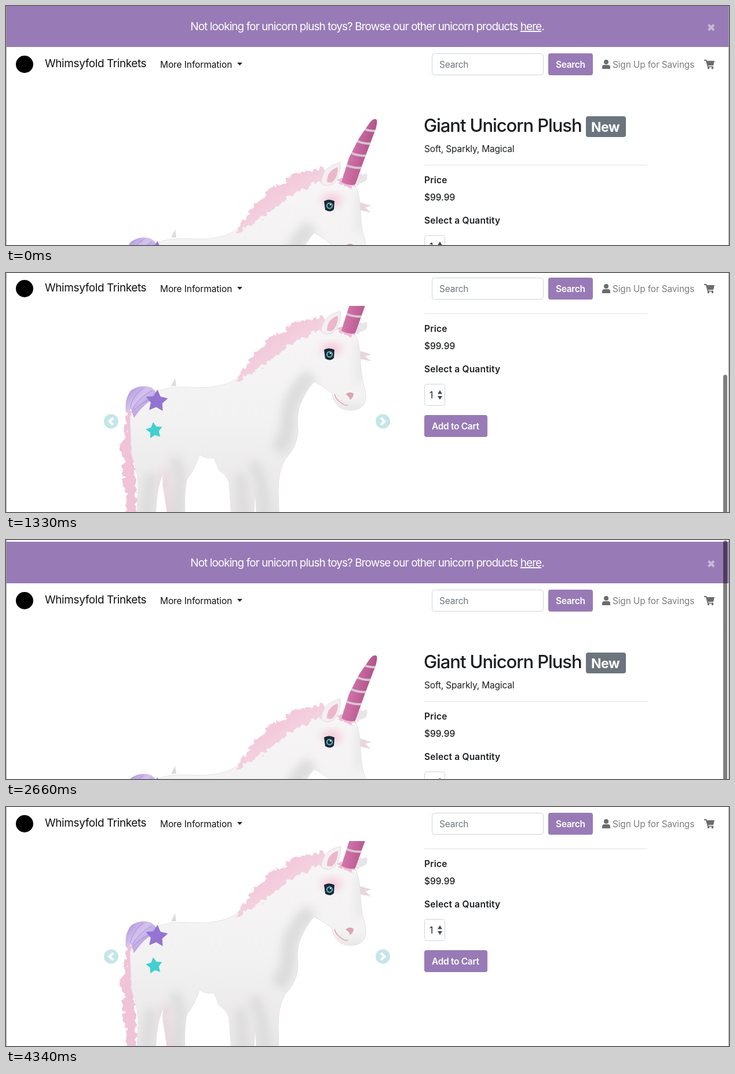
Animation of 1248 by 414 pixels, one loop 4410 ms. Source, as an HTML page:

```html
<!DOCTYPE html>
<html lang="en">
<head>
<meta charset="utf-8">
<title>Plush shop</title>
<style>
  html, body { margin: 0; width: 100%; height: 100%; overflow: hidden; background: #fff; }
  #stage { position: relative; width: 1248px; height: 414px; overflow: hidden; background: #fff; }
  #stage > * { position: absolute; left: 0; top: 0; }
  #page, #nav { will-change: transform; }
  svg { display: block; overflow: visible; }
  text { font: 400 15.5px Inter, Roboto, sans-serif; letter-spacing: -.18px; fill: #1b1e21; white-space: pre; }
  .brand { font-size: 19px; letter-spacing: -.42px; fill: #111; }
  .lead { font-size: 19px; letter-spacing: -.96px; fill: #fff; text-anchor: middle; }
  .menu { letter-spacing: -.1px; fill: #111; }
  .title { font-size: 31px; font-weight: 500; letter-spacing: -1.08px; }
  .badge { font-size: 23px; font-weight: 700; letter-spacing: -.5px; fill: #fff; }
  .label { font-weight: 600; letter-spacing: .2px; }
  .price { font-weight: 500; letter-spacing: 0; }
  .button { font-weight: 600; letter-spacing: -.32px; fill: #fff; }
  .hint { fill: #6c757d; }
  .soft { fill: #7d7d7d; }
  .purple { fill: #987bb6; }
  .field { fill: #fff; stroke: #ced4da; }
  #thumb { left: 1238px; width: 7px; height: 520px; border-radius: 4px; background: rgba(0,0,0,.5); }
  .edge { width: 1px; height: 414px; background: #a5a5a5; }
</style>
</head>
<body>
<div id="stage">
  <div id="page">
    <svg width="1248" height="700">
      <defs>
        <filter id="fur" x="-20%" y="-20%" width="140%" height="140%" color-interpolation-filters="sRGB">
          <feTurbulence type="fractalNoise" baseFrequency=".12" numOctaves="2" seed="4"/>
          <feDisplacementMap in="SourceGraphic" scale="15" xChannelSelector="R" yChannelSelector="G"/>
        </filter>
        <filter id="blur" x="-50%" y="-50%" width="200%" height="200%"><feGaussianBlur stdDeviation="8"/></filter>
        <linearGradient id="coat" x1="0" y1="0" x2="0" y2="1">
          <stop offset="0" stop-color="#f7f5f6"/><stop offset=".45" stop-color="#f3f2f2"/><stop offset="1" stop-color="#e6e4e5"/>
        </linearGradient>
        <linearGradient id="maneTone" x1="0" y1="0" x2="1" y2="1">
          <stop offset=".3" stop-color="#f3c6d9"/><stop offset=".75" stop-color="#f4dbe4"/>
        </linearGradient>
        <linearGradient id="hornTone" x1="0" x2="1" y1="0" y2=".4">
          <stop offset="0" stop-color="#dd94bd"/><stop offset=".5" stop-color="#ca6ba1"/><stop offset="1" stop-color="#a94d82"/>
        </linearGradient>
        <linearGradient id="satin" x1="0" x2="1" y1="0" y2="1">
          <stop offset="0" stop-color="#a78ad4"/><stop offset=".4" stop-color="#d3c2ee"/><stop offset="1" stop-color="#9a78cd"/>
        </linearGradient>
        <clipPath id="hornClip"><path id="hornShape" d="M628-1Q635-10 640-6Q642 2 634 21L619 61L603 106Q592 109 579 102L592 60L610 25Z"/></clipPath>
        <clipPath id="bodyClip"><use href="#body"/></clipPath>
        <path id="body" d="M214 252Q226 220 258 208Q280 198 315 200Q352 203 380 194Q402 186 424 164Q458 132 492 111Q525 89 560 91L604 109Q611 126 612 157Q613 183 620 205Q625 228 611 236Q596 244 578 236Q565 227 563 211Q553 202 532 190Q518 204 507 232Q501 251 504 275Q504 301 481 326Q470 346 470 378L472 450H434L430 377L426 450H391L385 365Q380 350 368 344L359 322Q344 325 334 316Q327 341 313 358Q306 376 310 450H283L273 382Q268 362 273 347Q257 371 258 450H224L228 380Q229 348 217 318Z"/>
        <g id="arrow">
          <circle r="12.5" fill="#c4e6e8"/>
          <path d="M3.5-6L-3 0L3.5 6" fill="none" stroke="#fff" stroke-width="4"/>
        </g>
      </defs>

      <rect class="purple" y="-1" width="1248" height="72"/>
      <text class="lead" x="623.5" y="42">Not looking for unicorn plush toys? Browse our other unicorn products <tspan text-decoration="underline">here</tspan>.</text>
      <path d="M1212.5 32.5L1222 42M1222 32.5L1212.5 42" stroke="#c8b9d8" stroke-width="4"/>

      <g transform="translate(0 203)">
        <path filter="url(#fur)" fill="#f0c3d7" d="M207 238L220 242L217 300L224 345L225 450H205L208 385L201 350L203 325L196 303L206 286Z"/>
        <path fill="#dfdadd" d="M285 198L292 184L294 198Z"/>
        <use href="#body" fill="url(#coat)" stroke="#e5e2e4"/>
        <g clip-path="url(#bodyClip)">
          <g filter="url(#blur)" fill="none" stroke="#d6d5d6" stroke-width="16" opacity=".8">
            <path d="M528 180Q496 205 488 245Q490 280 470 310" stroke-width="26"/>
            <path d="M425 330Q446 350 448 450M405 350L412 450M290 322L300 350L296 450M250 350L240 450"/>
            <path d="M276 342Q270 380 287 450" stroke="#e9c6d2" stroke-width="10"/>
            <path d="M568 225Q590 245 616 232M610 120V190" stroke-width="7"/>
          </g>
        </g>
        <path filter="url(#fur)" fill="url(#maneTone)" d="M396 191L407 170L417 160L428 140L445 128L454 113L477 105L493 90L516 85L546 76L558 94L530 106L500 120L469 144L436 169Z"/>
        <path filter="url(#fur)" fill="#e9e4e7" d="M600 87L622 87L625 96L606 109Z"/>
        <path filter="url(#fur)" fill="#efbfd4" d="M570 101L586 89L602 106L599 115Z"/>
        <path fill="#f4f0f2" stroke="#e2d9de" d="M544 104Q545 76 577 68Q579 91 566 104Q554 112 544 104Z"/>
        <path fill="#edb7cb" d="M554 102Q554 82 573 76Q573 95 562 103Z"/>
        <use href="#hornShape" fill="url(#hornTone)"/>
        <g id="bands" clip-path="url(#hornClip)" fill="none" stroke="#d8c6d3" stroke-width="4"></g>

        <ellipse cx="562" cy="134" rx="17" ry="9" fill="#f2bfd2" filter="url(#blur)"/>
        <path fill="#1d2733" d="M549 135Q557 130 567 135L566 149Q560 156 551 150Z"/>
        <circle cx="558.5" cy="143" r="4.6" fill="#172d38" stroke="#4eb6bd" stroke-width="2.2"/>
        <circle cx="560" cy="141" r="1.3" fill="#fff"/>
        <path fill="#e8d6dd" d="M611 137L631 143L620 146L630 155L612 151Z"/>
        <path fill="#dba5b2" d="M586 212Q594 206 600 211Q600 217 594 222Q593 216 586 212Z"/>
        <path fill="none" stroke="#dda9b6" stroke-width="1.6" d="M567 212Q570 223 582 229Q587 233 590 230"/>

        <path fill="url(#satin)" d="M207 243Q204 221 215 206Q231 194 250 200Q262 208 260 218Q240 225 221 253L216 238Z"/>
        <path fill="none" stroke="#8969bd" opacity=".55" d="M214 235Q221 211 237 201M218 239Q230 217 252 206M217 244Q232 226 258 216"/>
        <path class="star" data-star="260 224 20 4" fill="#9474d3"/>
        <path class="star" data-star="256 275 15 -8" fill="#42d0d0"/>
      </g>
      <use href="#arrow" x="181.5" y="462"/>
      <use href="#arrow" transform="translate(650.5 462) scale(-1 1)"/>

      <text class="title" x="721" y="218">Giant Unicorn Plush</text>
      <rect x="1001" y="191" width="69" height="36" rx="4" fill="#6c757d"/>
      <text class="badge" x="1010" y="218">New</text>
      <text x="722" y="253">Soft, Sparkly, Magical</text>
      <rect x="722" y="275" width="385" height="1" fill="#e3e3e3"/>
      <text class="label" x="722" y="307">Price</text>
      <text class="price" x="722" y="337">$99.99</text>
      <text class="label" x="722" y="377">Select a Quantity</text>
      <rect class="field" x="722.5" y="397.5" width="35" height="37" rx="4"/>
      <text x="731" y="422" fill="#495057">1</text>
      <path fill="#444c54" d="M745 414.5L749 408L753 414.5ZM745 418L749 424.5L753 418Z"/>
      <rect class="purple" x="722" y="451" width="109" height="38" rx="4"/>
      <text class="button" x="735" y="476">Add to Cart</text>
    </svg>
  </div>

  <div id="nav">
    <svg width="1248" height="131">
      <rect y="71" width="1248" height="60" fill="#fff"/>
      <circle cx="32" cy="101" r="15"/>
      <text class="brand" x="67" y="106">Whimsyfold Trinkets</text>
      <text class="menu" x="266" y="107">More Information</text>
      <path d="M399 98H408L403.5 103Z" fill="#212529"/>
      <rect class="field" x="735.5" y="82.5" width="192" height="37" rx="4"/>
      <text class="hint" x="748" y="107">Search</text>
      <rect class="purple" x="936" y="82" width="77" height="38" rx="4"/>
      <text class="button" x="949" y="107">Search</text>
      <g fill="#6c6c6c">
        <circle cx="1036" cy="97" r="4"/>
        <path d="M1029 109V106Q1029 102 1033 102H1039Q1043 102 1043 106V109Z"/>
        <path d="M1205 93H1209L1210 95H1223L1221 103H1212L1212.5 104.5H1221V106H1211L1208 95H1205Z"/>
        <circle cx="1212.5" cy="107.5" r="1.7"/><circle cx="1219.5" cy="107.5" r="1.7"/>
      </g>
      <text class="soft" x="1047" y="107">Sign Up for Savings</text>
    </svg>
  </div>
  <div id="thumb"></div>
  <div class="edge"></div>
  <div class="edge" style="left:1247px"></div>
</div>

<script>
const LOOP = 4410, STEP = 70, BANNER = 72, END = 203;
// [time in ms, scroll offset in px]; offsets outside 0..END are the rubber band
const track = [
  [0, 0], [210, 5], [420, 62], [630, 133], [770, 168], [910, 190], [1050, 203],
  [1190, 208], [1330, 205], [1540, 203], [1750, 197], [1890, 161], [2030, 109],
  [2170, 59], [2310, 20], [2450, -4], [2555, -8], [2660, -4], [2800, 0],
  [2940, 19], [3080, 67], [3220, 117], [3360, 157], [3500, 183], [3640, 197],
  [3780, 203], [LOOP, END]
];
const byId = id => document.getElementById(id);
const clamp = (v, lo, hi) => Math.min(hi, Math.max(lo, v));

function slope(i) {
  const a = track[i - 1], b = track[i + 1];
  return a && b && track[i][1] !== END ? (b[1] - a[1]) / (b[0] - a[0]) : 0;
}

function scrollAt(time) {
  const i = Math.max(0, track.findIndex(p => p[0] > time) - 1);
  const [t0, y0] = track[i], [t1, y1] = track[i + 1];
  const span = t1 - t0, u = (time - t0) / span, v = 1 - u;
  return v * v * (1 + 2 * u) * y0 + u * u * (3 - 2 * u) * y1
    + span * u * v * (v * slope(i) - u * slope(i + 1));
}

function starPath(x, y, radius, turn) {
  const points = Array.from({ length: 10 }, (_, i) => {
    const angle = (turn + i * 36 - 90) * Math.PI / 180;
    const r = i % 2 ? radius * .52 : radius;
    return `${x + r * Math.cos(angle)} ${y + r * Math.sin(angle)}`;
  });
  return `M${points.join('L')}Z`;
}

document.querySelectorAll('.star').forEach(star =>
  star.setAttribute('d', starPath(...star.dataset.star.split(' ').map(Number))));

byId('bands').innerHTML = [11, 33, 54, 75].map((y, i) =>
  `<path d="M${613 - i * 9} ${y - 3}q14 7 32 5"/>`).join('');

function draw(now) {
  const time = Math.floor(now % LOOP / STEP) * STEP;
  const scroll = Math.round(scrollAt(time));
  const navY = Math.max(-scroll, -BANNER) - Math.max(0, scroll - END);
  byId('page').style.transform = `translateY(${-scroll}px)`;
  byId('nav').style.transform = `translateY(${navY}px)`;
  byId('thumb').style.transform = `translateY(${Math.max(1, 1 + scroll * .855)}px)`;
  byId('thumb').style.opacity = time < STEP ? 0 : clamp((4270 - time) / 210, 0, 1);
}

const start = performance.now();
function tick() {
  draw(performance.now() - start);
  requestAnimationFrame(tick);
}
tick();
</script>
</body>
</html>
```
